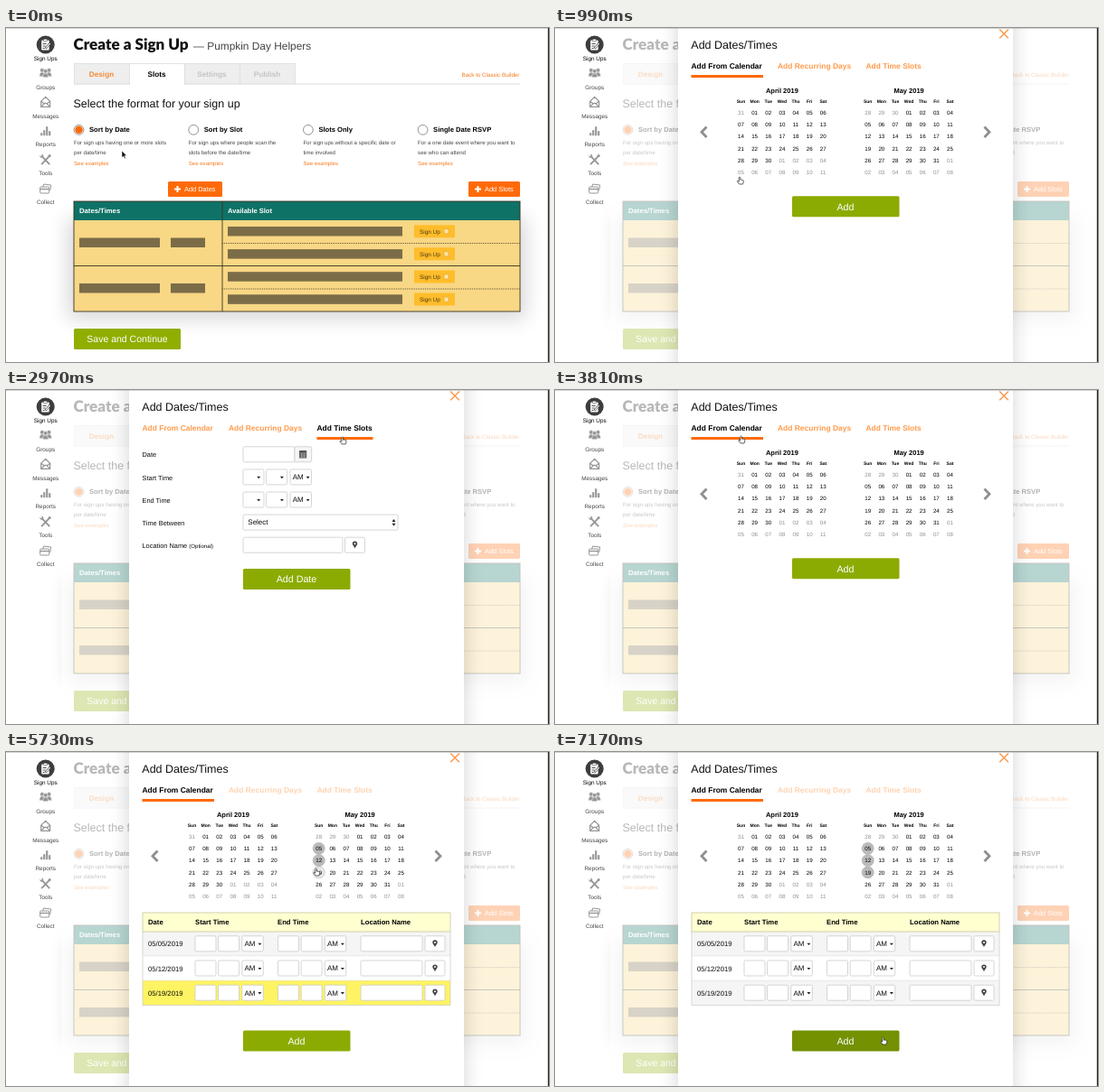
These frames come from a looping animation (600 by 370 pixels, 7.2 s). An HTML page:

```html
<!DOCTYPE html>
<html lang="en">
<head>
<meta charset="utf-8">
<title>Sign up builder</title>
<style>
  html, body { margin: 0; width: 100%; height: 100%; overflow: hidden; background: #fff; }
  svg { display: block; width: 600px; height: 370px; font-family: "Liberation Sans", Arial, sans-serif; }
  text { text-rendering: geometricPrecision; }
  .bold { font-weight: 700; }
  .heading { font-family: Lato, sans-serif; font-weight: 900; }
  .mid { text-anchor: middle; }
</style>
</head>
<body>
<svg id="stage" viewBox="0 0 600 370" xmlns="http://www.w3.org/2000/svg"></svg>
<script>
const LOOP = 7200;
const ORANGE = '#ff6a08', GREEN = '#8cab02', INK = '#0c0c0c';

// ---------- markup helpers ----------
const rect = (x, y, w, h, fill, extra = '') =>
  `<rect x="${x}" y="${y}" width="${w}" height="${h}" fill="${fill}" ${extra}/>`;
const text = (x, y, str, size, fill = INK, cls = '', extra = '') =>
  `<text x="${x}" y="${y}" font-size="${size}" fill="${fill}" class="${cls}" ${extra}>${str}</text>`;
const path = (d, fill, stroke = 'none', width = 1, extra = '') =>
  `<path d="${d}" fill="${fill}" stroke="${stroke}" stroke-width="${width}" ${extra}/>`;
const line = (x1, y1, x2, y2, stroke, width = 1, extra = '') =>
  path(`M${x1} ${y1}L${x2} ${y2}`, 'none', stroke, width, extra);
const circle = (x, y, r, fill, extra = '') =>
  `<circle cx="${x}" cy="${y}" r="${r}" fill="${fill}" ${extra}/>`;
const group = (id, body, extra = '') => `<g id="${id}" ${extra}>${body}</g>`;
const times = (n, fn) => Array.from({ length: n }, (_, i) => fn(i)).join('');

// ---------- sidebar ----------
function sidebar() {
  const gray = '#969696';
  const icons = [
    circle(0, 0, 10, '#3d3d3d') + rect(-4.5, -5, 8.5, 11, '#fff', 'rx="1"') + rect(-2.3, -6.3, 4.2, 2.6, '#fff', 'rx="1" stroke="#3d3d3d" stroke-width=".6"')
      + path('M-3-1H1M-3 1.5H0M-3 4H-1', 'none', '#3d3d3d', .9) + path('M0 4L5-1.5', 'none', '#3d3d3d', 2.4) + path('M.5 3.5L5-1.3', 'none', '#fff', 1.1),
    [[-3.8, -2], [3.8, -2], [0, -1]].map(([x, y]) => circle(x, y - 1.5, 2.3, gray, 'stroke="#fff" stroke-width=".5"')
      + path(`M${x - 3} ${y + 5.4}q0-4.8 3-4.8t3 4.8z`, gray, '#fff', .5)).join(''),
    path('M-5 5V-1L0-6 5-1V5ZM-5 5L-1 1H1L5 5M-5-1L-1 2M5-1L1 2', 'none', gray, 1.2),
    [3, 6, 10, 5].map((h, i) => rect(-5.5 + i * 3, 5 - h, 2.1, h, gray)).join(''),
    path('M-4.5-4.5L4.5 5M4.5-4.5L-4.5 5', 'none', gray, 1.9) + circle(-4.3, -4.3, 2, gray) + circle(4.5, -4.5, 1.5, gray) + circle(-5, -5.2, 1, '#fff'),
    path('M-3-2L-2-5 6-4 5 2', 'none', gray, 1) + rect(-6, -2, 10, 7, '#fff', `rx="1" stroke="${gray}"`) + line(-6, .5, 4, .5, gray, 1.4)
  ];
  const labels = ['Sign Ups', 'Groups', 'Messages', 'Reports', 'Tools', 'Collect'];
  return labels.map((label, i) =>
    `<g transform="translate(43.7 ${18.5 + i * 31.9})">${icons[i]}</g>`
    + text(43.7, 36.2 + i * 31.7, label, 6.4, i ? '#444' : '#000', 'mid')).join('');
}

// ---------- page behind the dialog ----------
function plusButton(x, y, w, label) {
  return rect(x, y, w, 17, ORANGE, 'rx="1.5"')
    + path(`M${x + 7} ${y + 8.5}h7m-3.5-3.5v7`, 'none', '#fff', 2)
    + text(x + 18, y + 11.2, label, 7.4, '#fff');
}

function formatChoice(i, title, first, second) {
  const x = 75 + i * 126.7;
  return circle(x + 5.5, 112.8, 5.4, '#fff', 'stroke="#777" stroke-width=".8"')
    + (i ? '' : circle(x + 5.5, 112.8, 4.3, ORANGE))
    + text(x + 17, 115.4, title, 7.6, '#000', 'bold')
    + text(x, 129, first, 6.1, '#444') + text(x, 140, second, 6.1, '#444')
    + text(x, 151.8, 'See examples', 6.1, '#f57a1c');
}

function slotTable() {
  const bar = '#7b6c48', edge = '#3b3420';
  return rect(69, 210, 505, 112, '#000', 'opacity=".16" filter="url(#soft)"')
    + rect(75, 192, 493, 122, '#f8d785')
    + rect(75, 192, 493, 21, '#0f7266')
    + text(81, 205.3, 'Dates/Times', 7.7, '#fff', 'bold')
    + text(245, 205.3, 'Available Slot', 7.5, '#fff', 'bold')
    + times(2, i => rect(81, 232.5 + i * 50.5, 89, 10.5, bar) + rect(182, 232.5 + i * 50.5, 38, 10.5, bar)
      + line(239, 238.5 + i * 50.5, 568, 238.5 + i * 50.5, edge, .8, 'stroke-dasharray="1 1"'))
    + times(4, i => {
      const y = 220 + i * 25.1;
      return rect(245, y, 193, 10.5, bar) + rect(451, y - 1.8, 45, 14, '#ffbd2b', 'rx="1"')
        + text(457, y + 7.7, 'Sign Up', 6.4, '#4a3a10')
        + rect(484, y + 2.8, 5, 5, '#ffe3a0', 'stroke="#d9a640" stroke-width=".6"');
    })
    + line(75, 263.5, 568, 263.5, edge, .9) + line(239, 192, 239, 314, edge, .9)
    + rect(75, 192, 493, 122, 'none', `stroke="${edge}" stroke-width=".9"`);
}

function page() {
  const tabs = [['Design', '#f58a35'], ['Slots', '#000'], ['Settings', '#c4c4c4'], ['Publish', '#c4c4c4']];
  return text(74.5, 23.5, 'Create a Sign Up', 17.1, '#111', 'heading')
    + text(207, 23.5, '— Pumpkin Day Helpers', 11.9, '#444')
    + line(75, 62, 568, 62, '#ddd')
    + tabs.map(([label, color], i) => {
      const x = 75 + i * 61;
      return rect(x + .5, 39.5, 61, 22.5, i === 1 ? '#fff' : '#eee', 'stroke="#dcdcdc" stroke-width=".8"')
        + (i === 1 ? rect(x + 1, 61, 60, 2, '#fff') : '')
        + text(x + 30.5, 53.8, label, 8.2, color, 'bold mid');
    }).join('')
    + text(503.5, 54, 'Back to Classic Builder', 6.25, '#f57a1c')
    + text(74.5, 87.8, 'Select the format for your sign up', 12.5, '#111')
    + formatChoice(0, 'Sort by Date', 'For sign ups having one or more slots', 'per date/time')
    + formatChoice(1, 'Sort by Slot', 'For sign ups where people scan the', 'slots before the date/time')
    + formatChoice(2, 'Slots Only', 'For sign ups without a specific date or', 'time involved')
    + formatChoice(3, 'Single Date RSVP', 'For a one date event where you want to', 'see who can attend')
    + plusButton(179, 170, 60, 'Add Dates') + plusButton(511, 170, 57, 'Add Slots')
    + slotTable()
    + rect(75, 333, 118, 23, '#8fae00', 'rx="1.5"')
    + text(134, 348.4, 'Save and Continue', 10.5, '#fff', 'mid');
}

// ---------- dialog parts ----------
const box = (x, y, w, fill = '#fff', h = 17) =>
  rect(x, y, w, h, fill, 'rx="1.5" stroke="#cbcbcb" stroke-width=".8"');
const caret = (x, y) => path(`M${x - 2} ${y - 1}h4l-2 2.4z`, '#222');
const pin = (x, y) => path(`M${x} ${y + 4}C${x - 1} ${y + 1.5} ${x - 2.7} ${y + .5} ${x - 2.7} ${y - 1.2}a2.7 2.7 0 0 1 5.4 0C${x + 2.7} ${y + .5} ${x + 1} ${y + 1.5} ${x} ${y + 4}z`, '#444')
  + circle(x, y - 1.2, 1, '#fff');
const amBox = (x, y) => box(x, y, 23.5) + text(x + 2.7, y + 11.4, 'AM', 8) + caret(x + 19.6, y + 8.9);
const emptySelect = (x, y) => box(x, y, 23) + caret(x + 17.2, y + 8.9);
const timePicker = (x, y) => emptySelect(x, y) + emptySelect(x + 25.7, y) + amBox(x + 52, y);
const dateField = y => box(262, y, 57) + box(319, y, 18.7, '#f6f6f6')
  + rect(324, y + 4.2, 8.2, 8.6, '#555', 'rx=".6"') + path(`M324.5 ${y + 7.2}h7.2m-7.2 2h7.2m-7.2 2h7.2m-5-4v5m2.7-5v5`, 'none', '#ddd', .4);
const selectField = y => box(262, y, 171) + text(267.3, y + 11.3, 'Select', 8)
  + path(`M426.5 ${y + 7.8}h4l-2-3zM426.5 ${y + 9.6}h4l-2 3z`, '#222');
const placeField = y => box(262, y, 110) + box(374.5, y, 22) + pin(385.5, y + 8.3);
const greenButton = (y, label, id = '') => rect(262, y, 118.5, 23, GREEN, `rx="1.5" id="${id}"`)
  + text(321, y + 15.3, label, 10.7, '#fff', 'mid');

const rowY = i => 62.8 + i * 25.1;
function form(labels, fields) {
  return labels.map(([label, optional], i) =>
    `<text x="150.5" y="${rowY(i) + 11.6}" font-size="7.4" fill="${INK}">${label}`
    + (optional ? ' <tspan font-size="6.1">(Optional)</tspan>' : '') + '</text>'
    + fields[i](rowY(i))).join('') + greenButton(198, 'Add Date');
}

const dayX = (left, col) => left + col * 15.13;
const dayY = row => 93.5 + row * 13.3;
const APRIL = 205.5, MAY = 345.7;

function month(left, name, lead, prevLast, length) {
  return text(dayX(left, 3), 71.5, name, 7.5, '#000', 'bold mid')
    + ['Sun', 'Mon', 'Tue', 'Wed', 'Thu', 'Fri', 'Sat'].map((d, i) =>
      text(dayX(left, i), 82.8, d, 5, '#000', 'bold mid')).join('')
    + times(42, i => {
      const n = i - lead + 1, inside = n > 0 && n <= length;
      const day = n < 1 ? prevLast + n : n > length ? n - length : n;
      return text(dayX(left, i % 7), dayY(Math.floor(i / 7)) + 2.2, String(day).padStart(2, '0'), 6.2,
        inside ? '#000' : '#909090', 'mid');
    });
}

function dateRow(i) {
  const y = 199 + i * 27.2, top = y + 4.8;
  return group('row' + i,
    rect(151, y, 340, 27.2, i % 2 ? '#fff' : '#f5f5f5', `id="rowBack${i}"`)
    + path(`M151 ${y}v27.2h340v-27.2`, 'none', '#cfcfcf', .8)
    + text(157, y + 16.3, ['05/05/2019', '05/12/2019', '05/19/2019'][i], 7.7)
    + [209, 300.5].map(x => box(x, top, 23) + box(x + 25.6, top, 23) + amBox(x + 51.8, top)).join('')
    + box(392, top, 68) + box(463, top, 22) + pin(474, top + 8.3));
}

function calendarPanel() {
  const head = [[157, 'Date'], [209, 'Start Time'], [300, 'End Time'], [392, 'Location Name']];
  return times(3, i => circle(MAY, dayY(i + 1), 6.6, '#bababa', `id="mark${i}" stroke="#b5b5b5" stroke-width=".6"`))
    + month(APRIL, 'April 2019', 1, 31, 30) + month(MAY, 'May 2019', 3, 30, 31)
    + path('M167.5 109.5L162 115.3 167.5 121', 'none', '#8f8f8f', 2.8)
    + path('M474.5 109.5L480 115.3 474.5 121', 'none', '#8f8f8f', 2.8)
    + group('dates', times(3, dateRow)
      + rect(151, 178, 340, 21, '#ffffd0', 'stroke="#c6c6a4" stroke-width=".8"')
      + head.map(([x, s]) => text(x, 191.2, s, 7.7, '#000', 'bold')).join(''))
    + group('addGroup', greenButton(0, 'Add', 'addButton'));
}

const TABS = [
  { x: 150.5, w: 79.5, label: 'Add From Calendar' },
  { x: 246, w: 81, label: 'Add Recurring Days' },
  { x: 343.5, w: 62, label: 'Add Time Slots' }
];

function dialog() {
  const twoTimes = y => timePicker(262, y) + text(339, y + 10.8, 'to', 7.6) + timePicker(348.3, y);
  const oneTime = y => timePicker(262, y);
  return rect(136, -30, 370, 430, '#000', 'opacity=".17" filter="url(#soft)"')
    + rect(136, 0, 370, 370, '#fff')
    + text(150.3, 22.6, 'Add Dates/Times', 12.5, '#111')
    + path('M491.2 1.5L501 11.3M501 1.5L491.2 11.3', 'none', '#ff9440', 1.3)
    + TABS.map((t, i) => text(t.x, 45, t.label, 8.45, '#000', 'bold', `id="tab${i}"`)).join('')
    + rect(0, 52, 0, 3, ORANGE, 'id="underline"')
    + group('panel0', calendarPanel())
    + group('panel1', form(
      [['First Date'], ['Time', true], ['Repeating'], ['End Repeat On'], ['Location Name', true]],
      [dateField, twoTimes, selectField, dateField, placeField]))
    + group('panel2', form(
      [['Date'], ['Start Time'], ['End Time'], ['Time Between'], ['Location Name', true]],
      [dateField, oneTime, oneTime, selectField, placeField]));
}

const HAND = 'M-1 0.8Q0-.8 1 .8V4Q2 3 2.6 4.2 3.6 3.4 4 4.6 5.2 4.2 5.2 5.6V7.4L4.2 10H-.6L-3.4 6.4Q-3.4 4.8-2 5.6L-1 6.4Z';
const ARROW = 'M0 0V7.6L1.8 6 3 8.8 4.2 8.3 3 5.6H5.4Z';

const stage = document.getElementById('stage');
stage.innerHTML =
  '<defs><filter id="soft" x="-20%" y="-50%" width="140%" height="200%"><feGaussianBlur stdDeviation="11"/></filter></defs>'
  + rect(0, 0, 600, 370, '#fff') + page()
  + rect(61, 0, 539, 370, '#fff', 'id="veil"')
  + group('dialog', dialog())
  + sidebar()
  + line(0, .25, 600, .25, '#888', .5) + line(599.4, 0, 599.4, 370, '#222', 1.2)
  + group('cursor', path(ARROW, '#111', '#fff', .5, 'id="arrow"')
    + path(HAND, '#fff', '#222', .9, 'id="hand" transform="translate(-.4 0) scale(.8)" stroke-linejoin="round"'));

// ---------- motion ----------
const el = {};
stage.querySelectorAll('[id]').forEach(node => { el[node.id] = node; });
const set = (id, name, value) => el[id].setAttribute(name, value);
const show = (id, on) => set(id, 'display', on ? 'inline' : 'none');
const ramp = (t, start, length) => Math.min(1, Math.max(0, (t - start) / length));
const smooth = p => p * p * (3 - 2 * p);
const mix = (a, b, p) => a + (b - a) * p;
const mixColor = (a, b, p) => `rgb(${a.map((v, i) => Math.round(mix(v, b[i], p)))})`;

const OPEN = 780;
const TAB_CLICKS = [[OPEN, 0], [1860, 1], [2700, 2], [3500, 0]];
const DATE_CLICKS = [4900, 5290, 5690];

// time, x, y of the pointer tip
const POINTER = [
  [0, 128, 136], [80, 128, 136], [640, 205, 175], [780, 205, 175], [990, 204.5, 165], [1250, 204.5, 165],
  [1780, 280, 52], [2150, 280, 52], [2600, 373, 52], [2950, 373, 52], [3450, 206, 51], [3900, 206, 51],
  [4700, 341, 110], [5080, 341, 110], [5260, 342.5, 117], [5420, 342.5, 117], [5640, 343, 129],
  [5950, 343, 129], [6650, 363, 316], [LOOP, 363, 316]
];
// spans in which the pointer rests on something clickable
const HAND_SPANS = [[540, 1330], [1690, 3960], [4400, 6010], [6520, LOOP]];

function pointerAt(t) {
  const i = Math.max(1, POINTER.findIndex(k => k[0] > t));
  const [t0, x0, y0] = POINTER[i - 1], [t1, x1, y1] = POINTER[i];
  const p = smooth(ramp(t, t0, t1 - t0));
  return [mix(x0, x1, p), mix(y0, y1, p)];
}

function render(t) {
  const open = smooth(ramp(t, OPEN, 170));
  set('veil', 'opacity', .7 * open);
  set('dialog', 'opacity', open);

  const [clicked, active] = TAB_CLICKS.filter(c => c[0] <= t).pop() || TAB_CLICKS[0];
  const grow = clicked === OPEN ? 1 : ramp(t, clicked, 180);
  const locked = ramp(t, DATE_CLICKS[0], 120);
  TABS.forEach((tab, i) => {
    show('panel' + i, i === active);
    set('tab' + i, 'fill', i === active ? '#000' : mixColor([255, 155, 76], [255, 211, 177], locked));
  });
  const thickness = mix(1, 3, grow);
  set('underline', 'x', TABS[active].x);
  set('underline', 'y', 53.5 - thickness / 2);
  set('underline', 'width', TABS[active].w * grow);
  set('underline', 'height', thickness);
  set('underline', 'opacity', mix(.3, 1, grow));

  const count = DATE_CLICKS.filter(c => c <= t).length;
  show('dates', count > 0);
  DATE_CLICKS.forEach((start, i) => {
    const plain = i % 2 ? [255, 255, 255] : [245, 245, 245];
    show('row' + i, i < count);
    set('rowBack' + i, 'fill', mixColor([255, 243, 82], plain, ramp(t, start, 430)));
    show('mark' + i, i < count);
    set('mark' + i, 'fill-opacity', ramp(t, start, 130));
  });
  const hover = ramp(t, 6560, 80);
  set('addGroup', 'transform', `translate(0 ${count ? 227 + count * 27.2 : 186.3})`);
  set('addButton', 'fill', mixColor([140, 171, 2], [115, 145, 0], hover));

  const [x, y] = pointerAt(t);
  const hand = HAND_SPANS.some(([a, b]) => t >= a && t < b);
  set('cursor', 'transform', `translate(${x} ${y})`);
  show('hand', hand);
  show('arrow', !hand);
}

const begin = performance.now();
function tick() {
  render((performance.now() - begin) % LOOP);
  requestAnimationFrame(tick);
}
tick();
</script>
</body>
</html>
```
